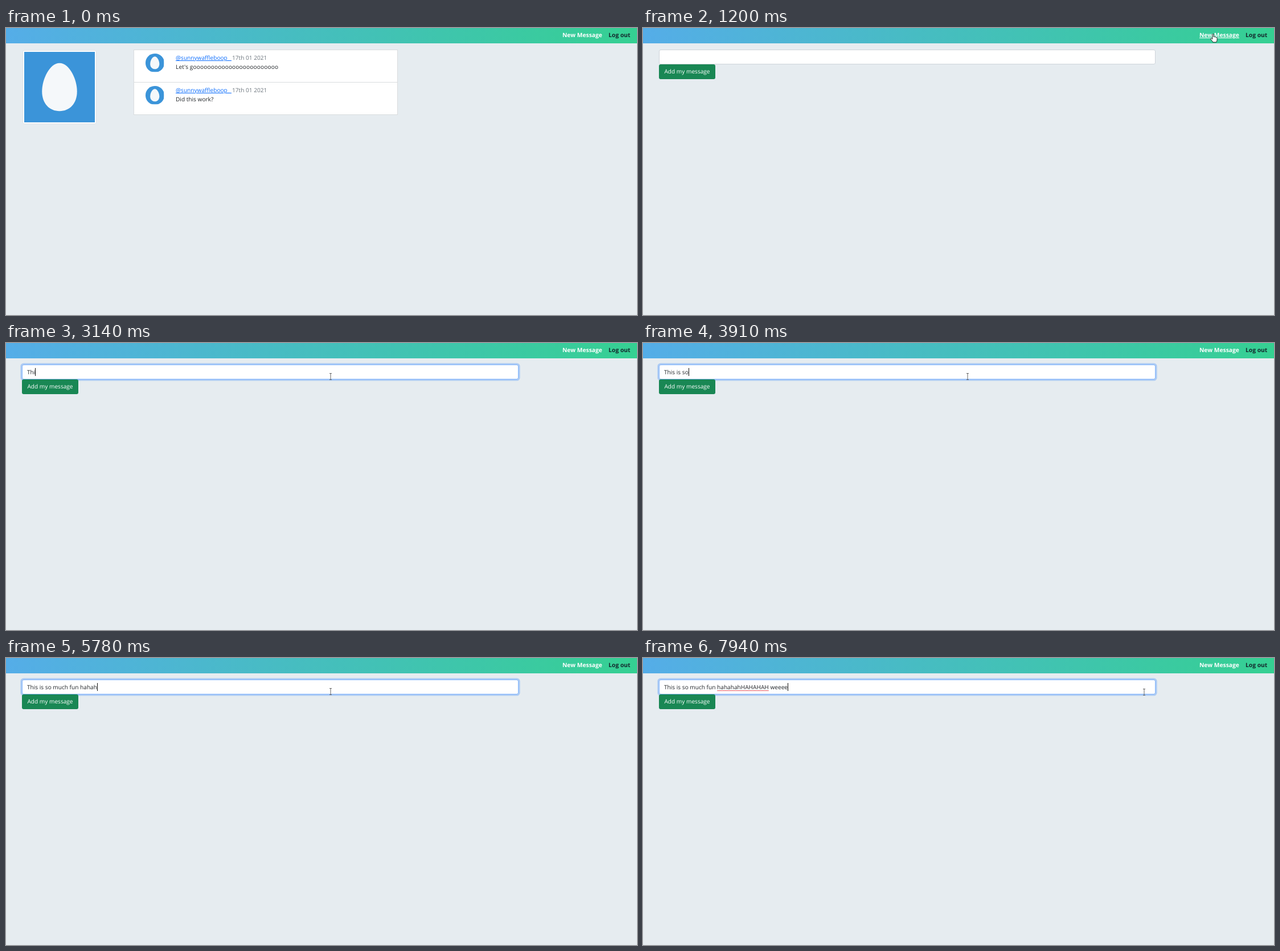
An HTML page for the animation above (8 s loop, 1108 by 505 pixels).

```html
<!DOCTYPE html>
<html lang="en">
<head>
<meta charset="utf-8">
<title>New message</title>
<style>
  html, body { margin: 0; width: 100%; height: 100%; overflow: hidden; }
  body {
    position: relative;
    background: #e6ecf0;
    color: #212529;
    font: 10.12px/16px "Open Sans", "Noto Sans", sans-serif;
    text-rendering: geometricPrecision;
    white-space: pre;
  }
  body *, svg { box-sizing: border-box; }
  .abs, .card, .card > * { position: absolute; }
  [hidden] { display: none !important; }

  #bar { left: 0; top: 0; width: 100%; height: 27px; background: linear-gradient(90deg, #55ade8, #35d092); }
  #bar span { position: absolute; top: 5px; font-size: 10.3px; font-weight: 700; }
  #new { left: 977px; color: #fff; }
  #out { left: 1058px; color: #14282d; }
  #new.hover { text-decoration: underline; }

  #avatar { left: 29px; top: 39px; width: 130px; height: 130px; padding: 2px; background: #fff; border: 1px solid #dee2e6; border-radius: 3px; }
  #avatar svg { display: block; width: 100%; height: 100%; }

  .card { left: 224px; width: 464px; height: 58px; background: #fff; border: 1px solid #d9dcde; }
  .card svg { left: 20px; top: 6px; width: 32.5px; height: 32.5px; border-radius: 50%; }
  .card a { left: 73px; top: 5px; color: #0d6efd; text-decoration: underline; }
  .card time { left: 172px; top: 5px; color: #6c757d; }
  .card p { left: 73px; top: 21px; margin: 0; }

  #field { left: 28px; top: 38px; width: 872px; height: 26px; background: #fff; border: 1px solid #ced4da; border-radius: 3px; }
  #ring { inset: -1px; border: 1px solid #86b7fe; border-radius: 3px; box-shadow: 0 0 0 2.6px rgba(13, 110, 253, .27); }
  #typed { left: 8px; top: 4px; }
  #laugh.marked { text-decoration: underline 1px #e5565f; text-underline-offset: 2px; }
  #caret { display: inline-block; width: 1px; height: 14px; margin-right: -1px; vertical-align: -3px; background: #111; }
  #add { left: 28px; top: 64px; width: 99px; height: 25.5px; line-height: 25.5px; text-align: center; background: #198754; color: #fff; border-radius: 3px; }

  #mouse { left: 0; top: 0; width: 0; height: 0; }
  #mouse svg { position: absolute; left: -10px; top: -10px; width: 32px; height: 32px; }
  #dot { position: absolute; left: -8.5px; top: -8.5px; width: 17px; height: 17px; border-radius: 50%; background: rgba(238, 235, 20, .62); }
</style>
</head>
<body>
<svg width="0" height="0" style="position:absolute">
  <symbol id="egg" viewBox="0 0 125 125">
    <rect width="125" height="125" fill="#3b94d9"/>
    <path fill="#f5f8fa" d="M62.5 20C80 20 93.5 49 93.5 70C93.5 92 80 105 62.5 105C45 105 31.5 92 31.5 70C31.5 49 45 20 62.5 20Z"/>
  </symbol>
</svg>

<div id="bar" class="abs"><span id="new">New Message</span><span id="out">Log out</span></div>

<main id="feed">
  <div id="avatar" class="abs"><svg><use href="#egg"/></svg></div>
  <div class="card" style="top:38px"><svg><use href="#egg"/></svg><a>@sunnywaffleboop_ </a><time>17th 01 2021</time><p style="letter-spacing:.13px">Let's goooooooooooooooooooooooo</p></div>
  <div class="card" style="top:95px"><svg><use href="#egg"/></svg><a>@sunnywaffleboop_ </a><time>17th 01 2021</time><p>Did this work?</p></div>
</main>

<main id="form" hidden>
  <div id="field" class="abs"><div id="ring" class="abs"></div><div id="typed" class="abs"><span id="before"></span><span id="laugh"></span><span id="after"></span><i id="caret"></i></div></div>
  <div id="add" class="abs">Add my message</div>
</main>

<div id="mouse" class="abs">
  <div id="dot"></div>
  <svg id="arrow" viewBox="-10 -10 32 32"><path d="M0 0V12.5L3 9.8L5 14.5L7 13.6L5 9H9Z" fill="#fff" stroke="#000" stroke-width=".8"/></svg>
  <svg id="hand" viewBox="-10 -10 32 32"><path d="M-.2 1.2Q1-.5 2.1 1.2V5.6Q3.4 4.7 4.3 6Q5.6 5.2 6.4 6.5Q8.1 6.1 8.1 8V11Q8 12.6 6.7 15H.8Q-.5 12.4-3.4 9.6Q-3.6 7.8-1.8 8.2L-.2 9.6Z" fill="#fff" stroke="#111" stroke-width=".9"/></svg>
  <svg id="beam" viewBox="-10 -10 32 32"><path d="M-2-5.5H2M0-5.5V5.5M-2 5.5H2" fill="none" stroke="#666" stroke-width="1"/></svg>
</div>

<script>
  const LOOP = 8000, PAGE = 1200, FOCUS = 2170, STEP = 90;
  const TEXT = "This is so much fun hahahahHAHAHAH weeee";
  const LAUGH = [20, 34];
  const MARKED = 7110;
  const $ = id => document.getElementById(id);
  const show = (id, on) => { $(id).hidden = !on; $(id).style.display = on ? "" : "none"; };

  // Each burst of keys: first time, last time, number of keys.
  const bursts = [
    [2980, 3300, 5], [3400, 3690, 4],
    [3830, 4770, 8],
    [4920, 5930, 10],
    [6250, 6630, 5], [6710, 6800, 2], [7000, 7000, 1], [7250, 7250, 1],
    [7400, 7400, 1], [7860, 7860, 1], [7940, 7940, 2]
  ];
  const keys = bursts.flatMap(([from, to, n]) =>
    Array.from({ length: n }, (_, i) => from + (to - from) * i / Math.max(1, n - 1)));

  // Time, x, y of the pointer.
  const path = [
    [200, 640, 128], [560, 880, 60], [840, 1000, 10], [1360, 1000, 10],
    [1600, 860, 52], [1960, 570, 59], [LOOP, 570, 59]
  ];
  const ease = u => u * u * (3 - 2 * u);

  function pointer(t) {
    const i = Math.max(1, path.findIndex(p => p[0] > t));
    const [a, b] = [path[i - 1], path[i]];
    const u = ease(Math.min(1, Math.max(0, (t - a[0]) / (b[0] - a[0]))));
    return [a[1] + (b[1] - a[1]) * u, a[2] + (b[2] - a[2]) * u];
  }

  function drawMouse(t) {
    const held = 200 + Math.floor((t - 200) / STEP) * STEP;
    const [x, y] = pointer(t < 1360 ? held : 1360 + Math.ceil((t - 1360) / STEP) * STEP);
    const onLink = x > 976 && y < 20;
    const onField = t >= PAGE && x < 900 && y > 38 && y < 64;
    show("mouse", t >= 200);
    $("mouse").style.transform = `translate(${x}px, ${y}px)`;
    show("hand", onLink);
    show("beam", onField);
    show("arrow", !onLink && !onField);
    show("dot", (t >= 1000 && t < PAGE) || (t >= FOCUS - 60 && t < 2290));
    $("new").classList.toggle("hover", t >= 200 && onLink);
  }

  function drawForm(t) {
    const n = keys.filter(k => k <= t + .01).length;
    const [a, b] = LAUGH;
    $("before").textContent = TEXT.slice(0, Math.min(n, a));
    $("laugh").textContent = TEXT.slice(a, Math.max(a, Math.min(n, b)));
    $("after").textContent = TEXT.slice(b, Math.max(b, n));
    $("laugh").classList.toggle("marked", t >= MARKED);
    $("ring").style.opacity = Math.min(1, Math.max(0, (t - FOCUS + 60) / 120));
    show("caret", t >= FOCUS && !(t >= 2670 && n === 0));
  }

  function frame(now) {
    const t = now % LOOP;
    show("feed", t < PAGE);
    show("form", t >= PAGE);
    drawMouse(t);
    drawForm(t);
    requestAnimationFrame(frame);
  }
  const start = performance.now();
  frame(0);
  requestAnimationFrame(function run() {
    frame = now => {
      const t = Math.max(0, now - start) % LOOP;
      show("feed", t < PAGE);
      show("form", t >= PAGE);
      drawMouse(t);
      drawForm(t);
      requestAnimationFrame(frame);
    };
    frame(performance.now());
  });
</script>
</body>
</html>
```
